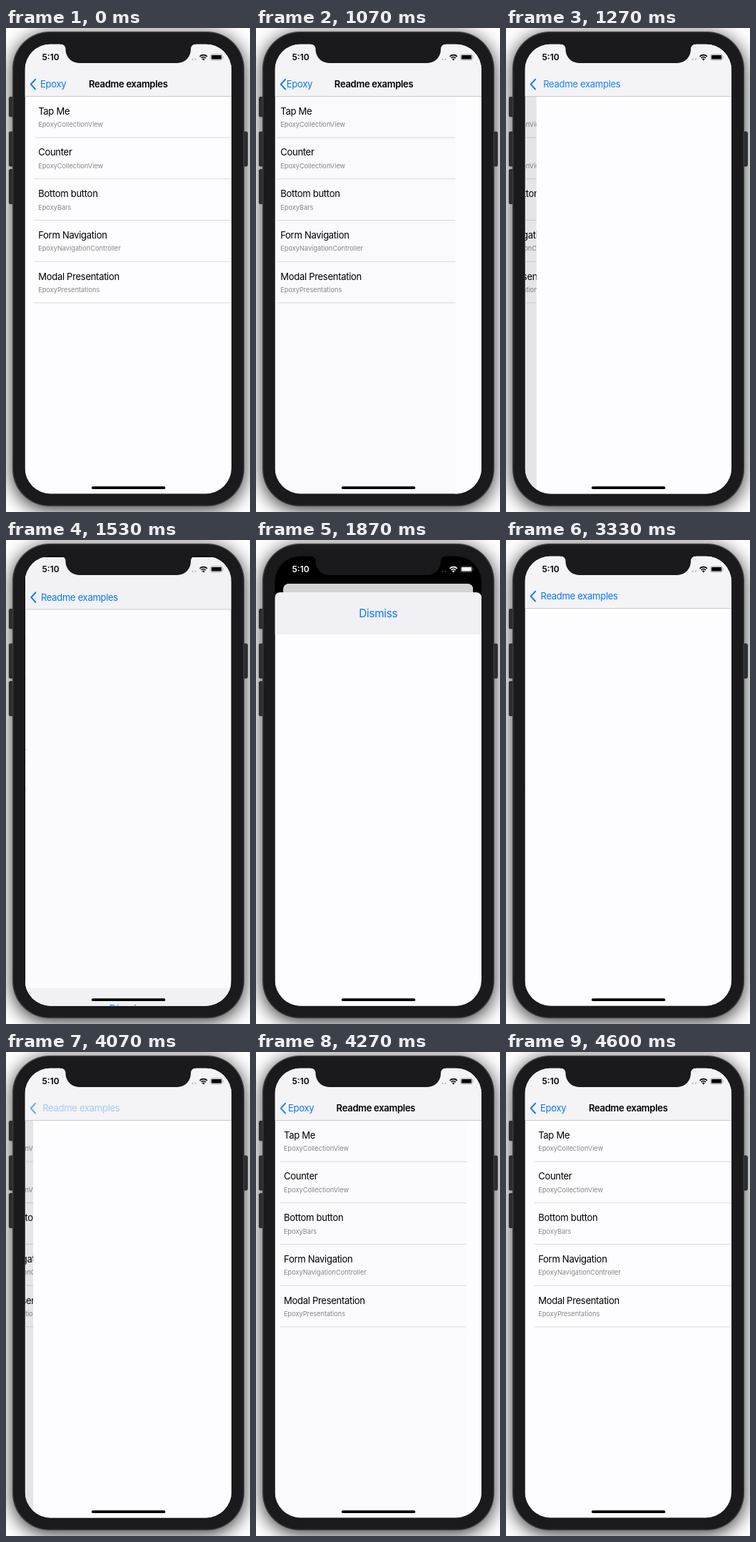
These frames come from a looping animation (342x676 px, 5340 ms). An HTML page:

```html
<!DOCTYPE html>
<html lang="en">
<head>
<meta charset="utf-8">
<title>Modal presentation demo</title>
<style>
  html, body { margin: 0; width: 100%; height: 100%; overflow: hidden; background: #fff; }
  svg { display: block; width: 342px; height: 676px; }
  text { font-family: Inter, "Liberation Sans", sans-serif; font-size: 13.1px; letter-spacing: -.33px; white-space: pre; }
  .bold { font-weight: 600; }
  .sub { font-size: 9.25px; letter-spacing: -.03px; fill: #87868a; }
  .blue { fill: #0a78f5; }
  .big { font-size: 15.4px; letter-spacing: -.35px; }
  .time { font-size: 12px; letter-spacing: 0; font-weight: 600; }
</style>
</head>
<body>
<svg viewBox="0 0 342 676">
  <defs>
    <filter id="blur" x="-30%" y="-30%" width="160%" height="160%"><feGaussianBlur stdDeviation="13"/></filter>
    <clipPath id="screen"><rect x="26.5" y="22.5" width="289.5" height="628" rx="36"/></clipPath>
    <clipPath id="card"><rect x="26.5" y="22.5" width="289.5" height="660" rx="8"/></clipPath>
    <clipPath id="body"><rect x="26.5" y="95.5" width="289.5" height="590"/></clipPath>
  </defs>

  <rect x="9" y="9" width="325" height="664" rx="52" opacity=".8" filter="url(#blur)"/>
  <g fill="#2d2e31" stroke="#19191b" stroke-width=".8">
    <rect x="4.4" y="96.4" width="8" height="27.4" rx="1.5"/>
    <rect x="4.4" y="145" width="8" height="48" rx="1.5"/>
    <rect x="4.4" y="197.6" width="8" height="48" rx="1.5"/>
    <rect x="330.4" y="145" width="8" height="48" rx="1.5"/>
  </g>
  <rect x="9" y="5" width="325" height="663" rx="52" fill="#3b3c40"/>
  <rect x="10.5" y="6.5" width="322" height="660" rx="50.5" fill="#1a191b"/>

  <g clip-path="url(#screen)">
    <rect x="26" y="22" width="291" height="630"/>
    <g id="presenter">
      <g clip-path="url(#card)">
        <rect x="26" y="22" width="291" height="662" fill="#fdfcfe"/>
        <g clip-path="url(#body)">
          <g id="list"></g>
          <rect id="shade" x="26" y="95" width="291" height="590"/>
          <rect id="page" x="26.5" y="95" width="291" height="590" fill="#fdfcfe"/>
        </g>
        <rect x="26" y="22" width="291" height="73.3" fill="#f4f3f5"/>
        <rect x="26" y="95.1" width="291" height=".9" fill="#c6c5c8"/>
        <path id="chevron" d="M41 71.8L34.8 78.6L41 85.4" fill="none" stroke="#0a78f5" stroke-width="2" stroke-linecap="round" stroke-linejoin="round"/>
        <text id="back" class="blue" y="83.2">Epoxy</text>
        <text id="title" class="bold" y="83.2">Readme examples</text>
        <text id="label" class="blue" y="83.2">Readme examples</text>
        <rect id="dim" x="26" y="22" width="291" height="662"/>
      </g>
    </g>
    <g id="sheet">
      <path id="sheetBody" fill="#fdfcfe"/>
      <path id="sheetHead" fill="#f1f0f4"/>
      <text id="dismiss" class="big" x="171.3" y="104" text-anchor="middle">Dismiss</text>
    </g>
  </g>

  <path d="M76 21.5V22.5Q83.5 22.5 83.5 30A19 19 0 0 0 102.5 49H240A19 19 0 0 0 259 30Q259 22.5 266.5 22.5V21.5Z" fill="#1a191b"/>
  <g id="status">
    <text class="time" x="50.5" y="45">5:10</text>
    <g opacity=".3">
      <circle cx="261.6" cy="43.7" r="1"/><circle cx="265.6" cy="43.7" r="1"/>
    </g>
    <g fill="none" stroke="currentColor" stroke-width="1.7">
      <path d="M271.6 39.8A7.4 7.4 0 0 1 282 39.8"/>
      <path d="M273.6 42A4.6 4.6 0 0 1 280 42"/>
    </g>
    <path d="M274.9 43.4A2.8 2.8 0 0 1 278.7 43.4L276.8 45.4Z"/>
    <rect x="286.9" y="36.9" width="16.2" height="7.8" rx="2.3" fill="none" stroke="currentColor" stroke-width=".8" opacity=".45"/>
    <rect x="288" y="38" width="14" height="5.6" rx="1.3"/>
    <path d="M304 39.3Q305.3 40.8 304 42.3Z" opacity=".5"/>
  </g>
  <rect x="120" y="640.3" width="103.3" height="3.8" rx="1.9"/>
</svg>
<script>
const LOOP = 5340, STEP = 200 / 3, WIDTH = 289.5, DROP = 582;
const PUSH = 1036, PRESENT = 1517, SETTLE = 2267, DISMISS = 2797, PRESS = 3930, POP = 4051;

const el = {};
for (const node of document.querySelectorAll('[id]')) el[node.id] = node;
const set = (node, attrs) => { for (const k in attrs) node.setAttribute(k, attrs[k]); };
const clamp = v => Math.max(0, Math.min(1, v));
const mix = (a, b, p) => a + (b - a) * p;
const rgb = (a, b, p) => `rgb(${a.map((v, i) => Math.round(mix(v, b[i], p)))})`;

// Critically damped spring from 0 to 1
const spring = ms => ms < 0 ? 0 : 1 - (1 + .02 * ms) * Math.exp(-.02 * ms);

const rows = [
  ['Tap Me', 'EpoxyCollectionView'],
  ['Counter', 'EpoxyCollectionView'],
  ['Bottom button', 'EpoxyBars'],
  ['Form Navigation', 'EpoxyNavigationController'],
  ['Modal Presentation', 'EpoxyPresentations']
];
el.list.innerHTML = rows.map(([name, kind], i) => {
  const y = 95.5 + i * 57.7;
  return `<text x="45.2" y="${y + 25.2}">${name}</text>
    <text class="sub" x="45.2" y="${y + 42.8}">${kind}</text>
    <rect x="39.7" y="${y + 57.2}" width="380" height=".8" fill="#d6d5d8"/>`;
}).join('');

function roundTop(bottom, r) {
  return `M26.5 ${bottom}V${69 + r}Q26.5 69 ${26.5 + r} 69H${316 - r}Q316 69 316 ${69 + r}V${bottom}Z`;
}

function drawNavigation(t) {
  const p = spring(t - PUSH) - spring(t - POP);
  set(el.list, { transform: `translate(${-.3 * WIDTH * p} 0)` });
  set(el.shade, { opacity: .1 * p });
  set(el.page, { transform: `translate(${WIDTH * (1 - p)} 0)` });

  const leaving = clamp(1.25 - 1.9 * p);
  const pressed = t >= PRESS;
  set(el.back, { x: 48 - 42 * p, opacity: leaving });
  set(el.title, { x: 116 - (46 + 21 * p) * p, opacity: leaving });
  set(el.label, { x: 48.5 + 66 * (1 - p), opacity: clamp((p - .3) / .7) * (pressed ? .35 : 1) });
  set(el.chevron, { opacity: pressed ? .62 + .38 * clamp((t - POP) / 300) : 1 });
}

function drawSheet(t) {
  const p = spring(t - PRESENT) - spring(t - DISMISS);
  const scale = 1 - .083 * p;
  set(el.presenter, { transform: `translate(${171.25 * (1 - scale)} ${22.5 * (1 - scale) + 39 * p}) scale(${scale})` });
  set(el.dim, { opacity: .14 * p });
  set(el.sheet, { transform: `translate(0 ${DROP * (1 - p)})`, visibility: p > .0005 ? 'visible' : 'hidden' });
  set(el.sheetBody, { d: roundTop(690, 8 * p) });
  set(el.sheetHead, { d: roundTop(127.5, 8 * p) });
  set(el.dismiss, { fill: rgb([10, 120, 245], [16, 113, 222], clamp((t - SETTLE) / 260)) });
  const ink = rgb([0, 0, 0], [255, 255, 255], p);
  set(el.status, { fill: ink, color: ink });
}

function draw(ms) {
  const t = Math.floor((ms % LOOP + 5) / STEP) * STEP % (80 * STEP);
  drawNavigation(t);
  drawSheet(t);
}

const start = performance.now();
function tick() {
  draw(performance.now() - start);
  requestAnimationFrame(tick);
}
tick();
</script>
</body>
</html>
```
